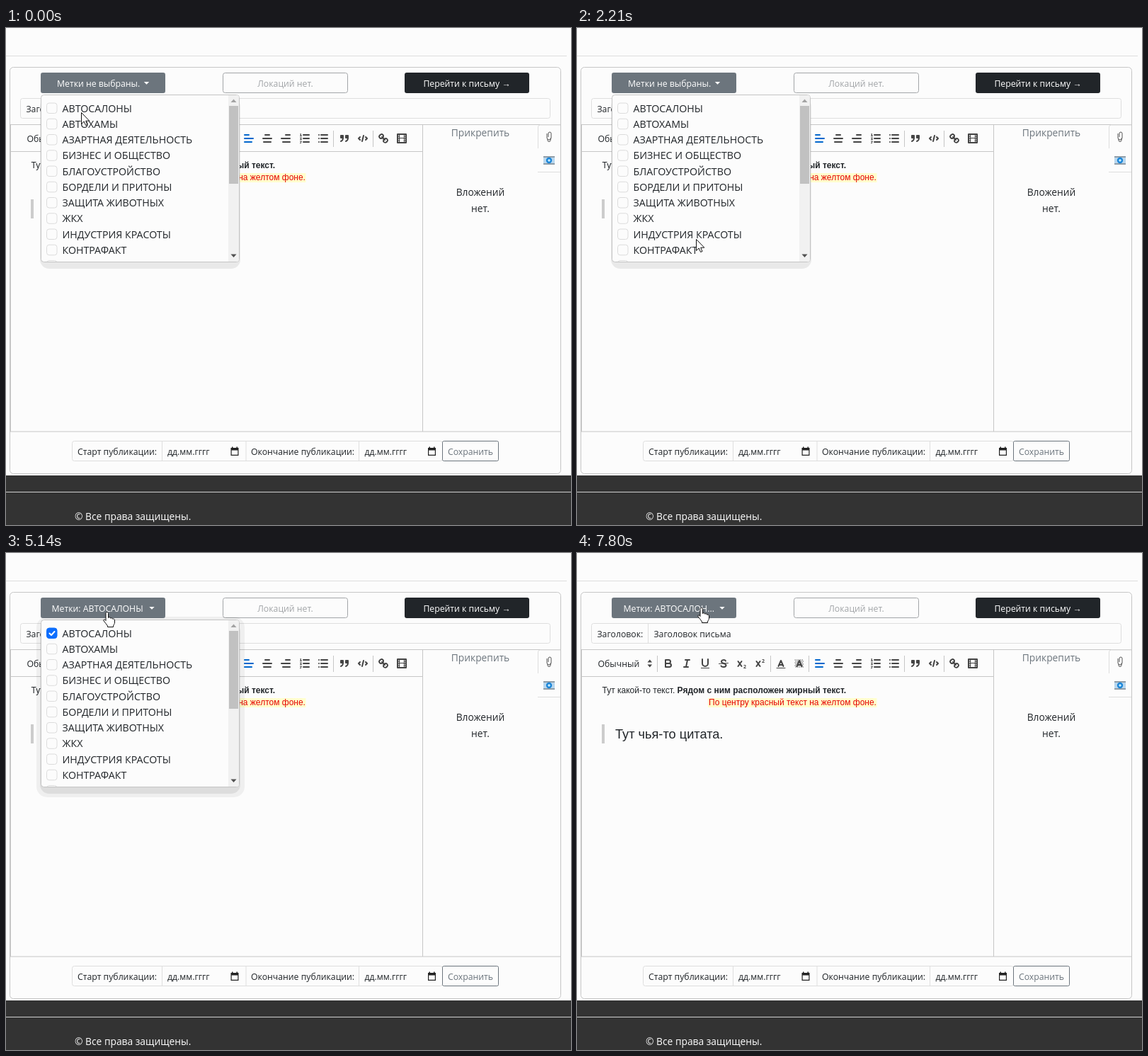
Animation, 798 px wide and 702 px high, one loop 8000 ms. Source, as an HTML page:

```html
<!DOCTYPE html>
<html lang="ru">
<head>
<meta charset="utf-8">
<title>Редактор письма</title>
<style>
html, body { margin: 0; width: 100%; height: 100%; overflow: hidden; background: #fcfcfc; }
svg { display: block; }
text { font: 12.25px "Open Sans", "Noto Sans", sans-serif; fill: #212529; white-space: pre; }
.mid { text-anchor: middle; }
.big { font-size: 13.8px; }
.muted { fill: #6c757d; }
.off { fill: #a2a5a8; }
.white { fill: #fff; }
.doc { font: 12px "Liberation Sans", Arial, sans-serif; }
.quote { font-size: 18.2px; }
.bold { font-weight: bold; }
.red { fill: #e60000; }
.row text { font-size: 14.2px; }
.row rect { fill: #fcfcfc; stroke: #dcdcdc; }
.row .bar { fill: none; stroke: none; }
.row .tick { fill: none; stroke: none; stroke-width: 2; stroke-linecap: round; stroke-linejoin: round; }
.row.on .box { fill: #0d6efd; stroke: #0d6efd; }
.row.on .tick { stroke: #fff; }
.row.press .bar { fill: #0d6efd; }
.row.press text { fill: #fff; }
.edge { fill: none; stroke: #dedede; }
.rule { fill: none; stroke: #c6c6c6; }
.icon { fill: none; stroke: #444; stroke-width: 2; stroke-linecap: round; stroke-linejoin: round; }
.icon .thin { stroke-width: 1; }
.icon .solid, .solid { fill: #444; stroke: none; }
.icon text { font: bold 7px "Open Sans", sans-serif; fill: #444; stroke: none; }
.blue { stroke: #06c; }
#tags rect { fill: #fcfcfc; stroke: #6c757d; }
#tags text, #tags path { fill: #6c757d; }
#tags.active rect { fill: #6c757d; }
#tags.active text, #tags.active path { fill: #fff; }
#picker path { fill: #444; }
#picker.hover text, #picker.hover path { fill: #06c; }
.cursor { fill: #fff; stroke: #111; stroke-linejoin: round; }
</style>
</head>
<body>
<svg width="798" height="702" viewBox="0 0 798 702">
  <rect width="798" height="702" fill="#fcfcfc"/>
  <path class="edge" d="M0 39.5H792"/>
  <rect class="rule" x="5.5" y="55.5" width="778" height="574" rx="5"/>

  <rect x="306.5" y="63.5" width="176" height="28" rx="3" fill="none" stroke="#a2a5a8"/>
  <text class="mid off" x="394.5" y="82.5">Локаций нет.</text>
  <rect x="563" y="63" width="176" height="29" rx="3" fill="#212529"/>
  <text class="mid white" x="651" y="82.5">Перейти к письму →</text>

  <rect class="edge" x="20.5" y="99.5" width="748" height="28" rx="3"/>
  <path class="edge" d="M100.5 100V127"/>
  <text x="28.5" y="118.5">Заголовок:</text>
  <text x="108.5" y="118.5">Заголовок письма</text>

  <path class="rule" d="M6 136.5H783M6.5 136V570M588.5 136V570M6 174.5H588M6 570H783"/>
  <path class="edge" d="M751.5 170V140q0-3 3-3H783M751 203.5H783"/>

  <g id="picker">
    <text x="29.5" y="160.5">Обычный</text>
    <path d="M99.5 154.5l3.3-4 3.3 4zM99.5 157.5l3.3 4 3.3-4z"/>
  </g>
  <path class="rule" d="M113.5 145v23M273.5 145v23M327.5 145v23M462.5 145v23M518.5 145v23"/>
  <g id="icons" class="icon"></g>

  <text class="doc" x="35.5" y="198">Тут какой-то текст. <tspan class="bold">Рядом с ним расположен жирный текст.</tspan></text>
  <rect x="185" y="205" width="238.5" height="13" fill="#ffc"/>
  <text class="doc red mid" x="304.5" y="215">По центру красный текст на желтом фоне.</text>
  <rect x="35" y="242" width="4" height="27" fill="#ccc"/>
  <text class="doc quote" x="54" y="262">Тут чья-то цитата.</text>

  <text class="mid big muted" x="670" y="153">Прикрепить</text>
  <text class="mid big" x="670" y="237">Вложений</text>
  <text class="mid big" x="670" y="259.5">нет.</text>
  <path fill="none" stroke="#555" d="M764 149v6a3 3 0 0 0 6 0v-6a2 2 0 0 0-4 0v5M765 157v1.500a2 2 0 0 0 4 0v-3"/>
  <rect x="759" y="181" width="16" height="12" rx="1" fill="#b9d7ee"/>
  <path fill="#8f9da8" d="M759 181h16v2h-16zM759 191h16v2h-16z"/>
  <circle cx="767" cy="187" r="4.200" fill="#1c86d8"/>
  <circle cx="767" cy="187" r="1.800" fill="#c8ecff"/>

  <rect class="edge" x="93.500" y="583.500" width="523" height="28" rx="3"/>
  <path class="edge" d="M220.500 584v27M339 584v27M498.500 584v27"/>
  <text x="101" y="603">Старт публикации:</text>
  <text x="228" y="603">дд.мм.гггг</text>
  <text x="346" y="603">Окончание публикации:</text>
  <text x="506.500" y="603">дд.мм.гггг</text>
  <path id="cal" fill="#222" fill-rule="evenodd" d="M317.500 593h1.500v-1.500h1.500v1.500h5v-1.500h1.500v1.500h1.500v11h-11zM318.700 596.500v6.300h8.600v-6.300z"/>
  <use href="#cal" x="278.500"/>
  <rect x="616.500" y="583.500" width="79" height="28" rx="2" fill="none" stroke="#6c757d"/>
  <text class="mid muted" x="656" y="603">Сохранить</text>

  <rect y="632" width="798" height="70" fill="#333"/>
  <path stroke="#d0d0d0" d="M0 655.500H798"/>
  <text class="big white" x="97" y="694.500">© Все права защищены.</text>

  <g id="shadow">
    <rect id="halo" x="43" y="90" width="294" height="255" rx="15" fill-opacity=".05"/>
    <rect x="48" y="98" width="283" height="242" rx="13" fill-opacity=".075"/>
  </g>
  <g id="tags">
    <rect x="49.500" y="63.500" width="175" height="28" rx="2"/>
    <text y="82.500"></text>
    <path d="M-3.700 76h7.400l-3.700 3.700z"/>
  </g>
  <g id="menu">
    <clipPath id="view"><rect x="50" y="95" width="279" height="235" rx="3"/></clipPath>
    <rect x="49.500" y="94.500" width="280" height="236" rx="4" fill="#fcfcfc" stroke="#c4c4c4"/>
    <g clip-path="url(#view)">
      <g id="list"></g>
      <rect x="314" y="95" width="15" height="235" fill="#f1f1f1"/>
      <rect id="thumb" x="315" width="13" height="110" fill="#c1c1c1"/>
      <path id="up" d="M317.500 105l4-4.500 4 4.500z"/>
      <path id="down" d="M317.500 319.500l4 4.500 4-4.500z"/>
    </g>
  </g>
  <path id="arrow" class="cursor" d="M.5.5V16.500L4.200 13 6.600 18.500 9 17.500 6.700 12.200H11.800Z"/>
  <path id="hand" class="cursor" d="M-.3.5C1 .5 1.500 1.300 1.500 2.500V8.500C2.200 7.300 4.500 7.500 4.700 9.200 5.600 8.400 7.600 8.700 7.700 10.300 8.800 9.600 10.500 10.200 10.500 12V15C10.500 17 9 18.500 8.500 20V21.500H.5V20C-1 17.500-3.500 15-5 12.800-5.800 11.200-4 10.300-2.900 11.400L-2 12.500V2.500C-2 1.300-1.500.5-.3.5Z"/>
</svg>
<script>
const $ = id => document.getElementById(id);
const LOOP = 8000, PITCH = 22.25, MAX_SCROLL = 202;

const tags = ['АВТОСАЛОНЫ', 'АВТОХАМЫ', 'АЗАРТНАЯ ДЕЯТЕЛЬНОСТЬ', 'БИЗНЕС И ОБЩЕСТВО',
  'БЛАГОУСТРОЙСТВО', 'БОРДЕЛИ И ПРИТОНЫ', 'ЗАЩИТА ЖИВОТНЫХ', 'ЖКХ', 'ИНДУСТРИЯ КРАСОТЫ',
  'КОНТРАФАКТ', 'МОБИЛЬНОЕ ПРИЛОЖЕНИЕ', 'НЕЗАКОННАЯ ТОРГОВЛЯ', 'НЕЗАКОННЫЕ АЗС И АГЗС',
  'НЕЗАКОННЫЕ ЛАРЬКИ', 'НЕЗАКОННЫЕ ПАРКОВКИ', 'НЕЗАКОННЫЙ ПРИЕМ МЕТАЛЛА',
  'ПРАВА ОСУЖДЕННЫХ', 'ЧЕРНЫЙ СПИСОК', 'ЭКОЛОГИЯ И СВАЛКИ'];

$('list').innerHTML = tags.map((name, i) => `
  <g class="row" transform="translate(0 ${113.5 + i * PITCH})">
    <rect class="bar" x="50" y="-11" width="264" height="22"/>
    <rect class="box" x="57.5" y="-7.5" width="14.500" height="14.500" rx="3.500"/>
    <path class="tick" d="M61.500 0l2.500 2.500 4.500-5"/>
    <text x="79.500" y="5">${name}</text>
  </g>`).join('');
const rows = $('list').children;

// Toolbar icons: centre x and markup on an 18 px grid
const lines = d => `<path d="${d}"/>`;
const thin = d => `<path class="thin" d="${d}"/>`;
const solid = d => `<path class="solid" d="${d}"/>`;
const icons = [
  [129, lines('M5 4H9.500a2.500 2.500 0 0 1 0 5H5zM5 9h5.500a2.500 2.500 0 0 1 0 5H5z')],
  [155, lines('M7 4h6M5 14h6M8 14L10 4')],
  [181, lines('M5 3v6a4 4 0 0 0 8 0V3') + solid('M3 15h12v1H3z')],
  [207, thin('M15.500 8.500l-13 1') + lines('M12 5.500C11 3.500 6 3.500 6 6.500 6 9.500 12.500 8.500 12.500 11.500 12.500 14.800 6.500 14.500 5.500 12.500')],
  [233, lines('M3.500 6l5 7M8.500 6l-5 7') + '<text x="11" y="16">2</text>'],
  [259, lines('M3.500 6l5 7M8.500 6l-5 7') + '<text x="11" y="8">2</text>'],
  [288, thin('M3 15.500h12') + lines('M5.500 13L9 5l3.500 8M6.500 11h5')],
  [314, '<path class="thin" stroke-dasharray=".5 2" d="M3 4h12M4 6h11M3 8h12M4 10h11M3 12h12M4 14h11"/>' + lines('M5.500 13L9 5l3.500 8M6.500 11h5')],
  [343, '<path class="blue" d="M3 4h6M3 9h12M3 14h10"/>'],
  [369, lines('M6 4h6M3 9h12M4 14h10')],
  [395, lines('M9 4h6M3 9h12M5 14h10')],
  [422, lines('M7 4h8M7 9h8M7 14h8') + thin('M2.500 3l1-.5v3M2.500 5.500h2M2.500 8h2l-2 2.500h2M2.500 13h2l-1 1.300q1.500 1-1 1.500')],
  [448, lines('M6 4h9M6 9h9M6 14h9M3 4h0M3 9h0M3 14h0')],
  [478, '<path fill="#444" d="M4 5h3v3H4zM11 5h3v3h-3z"/>' + lines('M7 8c0 4-3 5-3 5M14 8c0 4-3 5-3 5')],
  [504, lines('M5 7L3 9l2 2M13 7l2 2-2 2M10 5L8 13')],
  [533, lines('M7 7l4 4M8.900 4.600a3.500 3.500 0 0 1-4.300 4.300C3.200 7.500 2 6.400 4.200 4.200S7.500 3.200 8.900 4.600zM13.400 9.100a3.500 3.500 0 0 0-4.300 4.300c1.400 1.400 2.500 2.500 4.700.4S14.800 10.500 13.400 9.100z')],
  [559, lines('M3 3h12v12H3z') + thin('M5.500 3v12M12.500 3v12M5 8.500h8M3 6h3M3 9h3M3 12h3M12 6h3M12 9h3M12 12h3')]
];
$('icons').innerHTML = icons.map(([x, art]) => `<g transform="translate(${x - 9} 147)">${art}</g>`).join('');

// Pointer hot spot: time, x, y
const path = [
  [0, 106, 119], [120, 119, 125], [270, 121, 130], [540, 122, 138], [810, 125, 148],
  [930, 134, 170], [1070, 147, 213], [1200, 159, 253], [1340, 166, 287], [1460, 169, 319],
  [1820, 169, 306], [2210, 168, 298], [2610, 160, 270], [2730, 148, 236], [2850, 133, 202],
  [2970, 116, 172], [3090, 98, 148], [3210, 80, 128], [3330, 69, 116], [3450, 68, 114],
  [4090, 70, 122], [4210, 74, 134], [4450, 80, 141], [4600, 88, 112], [4720, 97, 85],
  [4870, 126, 83], [5020, 143, 83], [5510, 128, 112], [5630, 102, 142], [5750, 81, 159],
  [5900, 76, 173], [6020, 68, 160], [6170, 67, 160], [6580, 68, 160], [7010, 84, 140],
  [7130, 128, 118], [7250, 180, 84], [7370, 199, 77], [7660, 177, 77], [7800, 176, 77]
];
const scrolls = [[0, 0], [270, 20], [390, 85], [540, 120], [690, 190], [810, MAX_SCROLL],
  [1820, 165], [1940, 110], [2090, 35], [2210, 0]];
const labels = [[0, 'Метки не выбраны.', 72, 198.5], [3820, 'Метки: АВТОСАЛОНЫ', 64.5, 206],
  [6460, 'Метки: АВТОСАЛОН...', 65.5, 205]];

const at = (steps, t) => steps.findLast(s => s[0] <= t);
const within = (t, a, b) => t >= a && t < b;
const show = (id, on) => $(id).setAttribute('visibility', on ? 'visible' : 'hidden');
const move = (el, x, y) => el.setAttribute('transform', `translate(${x} ${y})`);
const [label, caret] = ['text', 'path'].map(tag => $('tags').querySelector(tag));

function draw(t) {
  const [, x, y] = at(path, t);
  const [, scroll] = at(scrolls, t);
  const [, text, textX, caretX] = at(labels, t);
  const open = t < 3970 || within(t, 5020, 6460);
  const picker = within(t, 6580, 7010);
  const hand = y < 92 || picker;

  show('menu', open);
  show('shadow', open);
  show('halo', open && t >= 5020);
  move($('list'), 0, -scroll);
  $('thumb').setAttribute('y', 110 + scroll * 95 / MAX_SCROLL);
  $('up').setAttribute('fill', scroll > 0 ? '#505050' : '#a3a3a3');
  $('down').setAttribute('fill', scroll < MAX_SCROLL ? '#505050' : '#a3a3a3');
  rows[0].classList.toggle('on', t >= 3820);
  rows[0].classList.toggle('press', within(t, 3700, 3820));
  rows[2].classList.toggle('press', within(t, 6310, 6460));

  $('tags').classList.toggle('active', open || y < 92);
  label.textContent = text;
  label.setAttribute('x', textX);
  move(caret, caretX, 0);
  $('picker').classList.toggle('hover', picker);

  show('arrow', !hand);
  show('hand', hand);
  move($(hand ? 'hand' : 'arrow'), x, y);
}

const start = performance.now();
(function tick() {
  draw((performance.now() - start) % LOOP);
  requestAnimationFrame(tick);
})();
</script>
</body>
</html>
```
